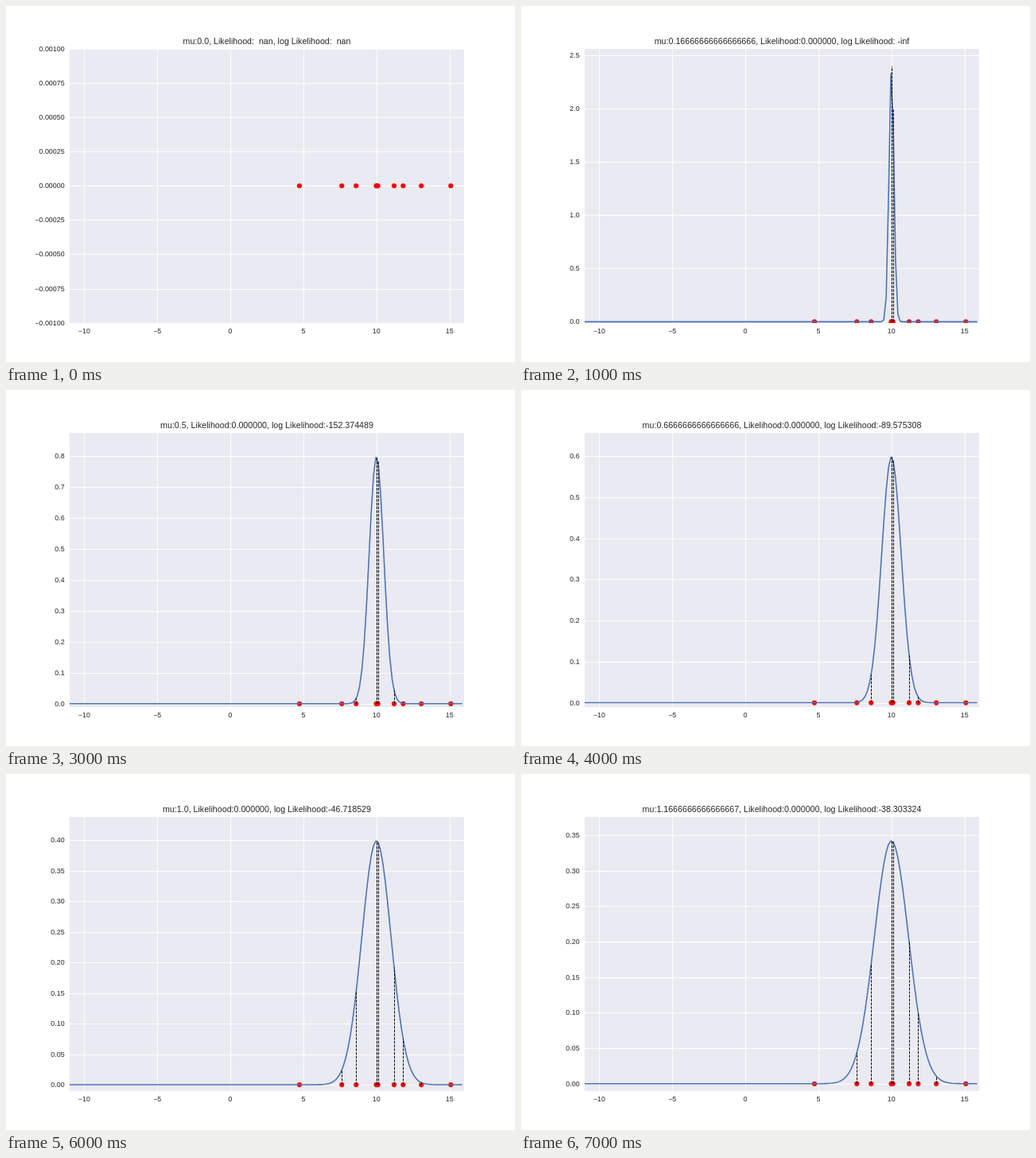
Animation, 640 px wide and 448 px high, one loop 8000 ms. Source, as an HTML page with a canvas:

```html
<!DOCTYPE html>
<html lang="en">
<head>
<meta charset="utf-8">
<title>Likelihood of a normal model</title>
<style>
  html, body { margin: 0; width: 100%; height: 100%; overflow: hidden; background: #fff; }
  canvas { display: block; width: 640px; height: 448px; }
</style>
</head>
<body>
<canvas id="plot" width="640" height="448"></canvas>
<script>
const ctx = document.getElementById('plot').getContext('2d');
const STEP_MS = 1000;
const MEAN = 10;
const BOX = { left: 80, right: 576, top: 53.76, bottom: 398.72 };
const X_MIN = -11, X_MAX = 16;
const SAMPLES = [4.73, 7.63, 8.61, 9.99, 10.01, 10.1, 11.21, 11.83, 13.07, 15.09];
const SQUARES = 75.058287737; // sum of squared distances from the mean
const FONT = '"Liberation Sans", Arial, sans-serif';

// One entry per step: printed parameter, tick spacing, tick decimals
const STEPS = [
  ['0.0', 0.00025, 5],
  ['0.16666666666666666', 0.5, 1],
  ['0.3333333333333333', 0.2, 1],
  ['0.5', 0.1, 1],
  ['0.6666666666666666', 0.1, 1],
  ['0.8333333333333333', 0.1, 1],
  ['1.0', 0.05, 2],
  ['1.1666666666666667', 0.05, 2]
];

const GRID_X = Array.from({ length: 169 }, (_, i) => X_MIN + i * 0.16);
const snap = v => Math.floor(v + 0.5) + 0.5;
const px = x => BOX.left + (x - X_MIN) / (X_MAX - X_MIN) * (BOX.right - BOX.left);
const density = (x, s) =>
  Math.exp(-((x - MEAN) ** 2) / (2 * s * s)) / (s * Math.sqrt(2 * Math.PI));

function logLikelihood(s) {
  const n = SAMPLES.length;
  const value = -n / 2 * Math.log(2 * Math.PI) - n * Math.log(s) - SQUARES / (2 * s * s);
  return value < -746 ? ' -inf' : value.toFixed(6);
}

function line(x1, y1, x2, y2) {
  ctx.beginPath();
  ctx.moveTo(x1, y1);
  ctx.lineTo(x2, y2);
  ctx.stroke();
}

function text(str, x, y, size, align) {
  ctx.font = `${size}px ${FONT}`;
  ctx.textAlign = align;
  ctx.fillStyle = '#262626';
  ctx.fillText(str, x, y);
}

function draw(step) {
  const [label, gap, decimals] = STEPS[step];
  const s = step / 6;
  const peak = step ? Math.max(...GRID_X.map(x => density(x, s))) : 0;
  const yMin = step ? -0.01 : -0.001;
  const yMax = step ? peak * 1.1 : 0.001;
  const py = y => BOX.bottom - (y - yMin) / (yMax - yMin) * (BOX.bottom - BOX.top);

  ctx.fillStyle = '#fff';
  ctx.fillRect(0, 0, 640, 448);
  ctx.fillStyle = '#eaeaf2';
  ctx.fillRect(80, 54, 496, 345);

  ctx.save();
  ctx.beginPath();
  ctx.rect(80, 54, 496, 345);
  ctx.clip();

  ctx.strokeStyle = '#fff';
  ctx.lineWidth = 0.89;
  for (let x = -10; x <= 15; x += 5) line(snap(px(x)), 54, snap(px(x)), 399);
  const ticks = [];
  for (let i = Math.ceil(yMin / gap - 1e-6); i <= yMax / gap + 1e-6; i++) {
    ticks.push(i * gap);
    line(80, snap(py(i * gap)), 576, snap(py(i * gap)));
  }

  ctx.fillStyle = '#f00';
  for (const x of SAMPLES) {
    ctx.beginPath();
    ctx.arc(px(x), py(0), 3.11, 0, 2 * Math.PI);
    ctx.fill();
  }

  if (step) {
    ctx.strokeStyle = '#4c72b0';
    ctx.lineWidth = 1.56;
    ctx.lineJoin = 'round';
    ctx.beginPath();
    for (const x of GRID_X) ctx.lineTo(px(x), py(density(x, s)));
    ctx.stroke();

    ctx.strokeStyle = '#000';
    ctx.lineWidth = 0.95;
    ctx.setLineDash([3.29, 1.42]);
    for (const x of SAMPLES) line(snap(px(x)), py(0), snap(px(x)), py(density(x, s)));
  }
  ctx.restore();

  for (let x = -10; x <= 15; x += 5) {
    text(String(x).replace('-', '\u2212'), px(x), 412, 8.89, 'center');
  }
  for (const y of ticks) {
    const str = (y < 0 ? '\u2212' : '') + Math.abs(y).toFixed(decimals);
    text(str, 73.6, Math.round(py(y) + 3), 8.89, 'right');
  }

  const like = step ? '0.000000' : '  nan';
  const log = step ? logLikelihood(s) : '  nan';
  text(`mu:${label}, Likelihood:${like}, log Likelihood:${log}`, 328, 48, 10.67, 'center');
}

let shown = -1;
function tick() {
  const step = Math.floor(performance.now() / STEP_MS) % STEPS.length;
  if (step !== shown) draw(shown = step);
  requestAnimationFrame(tick);
}
tick();
</script>
</body>
</html>
```
